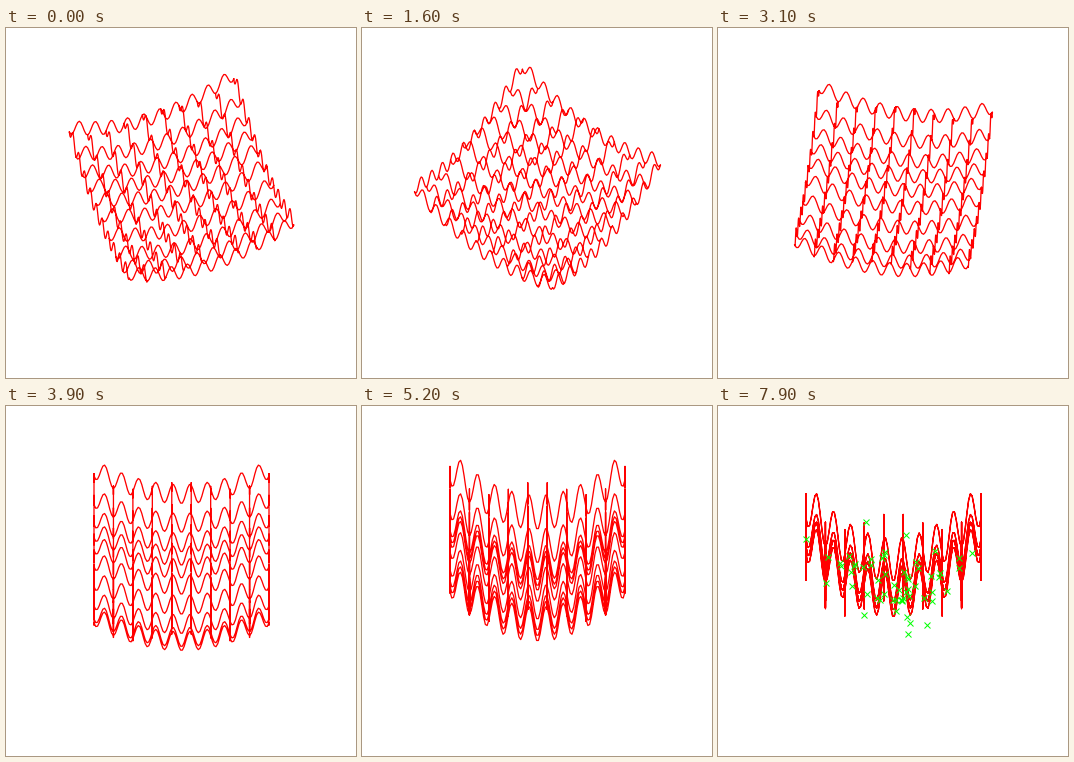
A matplotlib script that plays this animation: 350 px wide and 350 px high, repeating every 8 s.

```python
import matplotlib.pyplot as plt
import numpy as np
from matplotlib.animation import FuncAnimation

SIZE, DPI = 350, 100
FRAMES, STEP_MS = 80, 100
PX = 72 / DPI               # one pixel in points

LIMIT = 5.12                # Rastrigin domain
ISOLINES, SAMPLES = 10, 100
CX, CY = 175.5, 167.7       # projection centre
RX, RY = 87.5, 81.8         # half width and half height of the unit cube
Z_MID, Z_HALF = 32.5, 37.5

SPIN_END = 35               # turn about z stops, tilt begins
TILT_END = 71               # view is level, search points appear
POINTS = 58


def ridge(v):
    return v ** 2 + 10 * (1 - np.cos(2 * np.pi * v))


def lift(x, y):
    """Unit-cube coordinates of the surface above (x, y)."""
    return x / LIMIT, y / LIMIT, (ridge(x) + ridge(y) - Z_MID) / Z_HALF


def wireframe():
    """Isolines in both directions, separated by NaN."""
    run = np.append(np.linspace(-LIMIT, LIMIT, SAMPLES), np.nan)
    along = np.tile(run, ISOLINES)
    across = np.repeat(np.linspace(-LIMIT, LIMIT, ISOLINES), run.size)
    return lift(np.concatenate([along, across]),
                np.concatenate([across, along]))


def search_points():
    """Random trial points on the surface, densest near the optimum."""
    rng = np.random.default_rng(7)
    x = rng.normal(0.6, 2.4, POINTS)
    y = rng.normal(0, 2.2, POINTS)
    return lift(np.clip(x, -LIMIT, 4.6), np.clip(y, -LIMIT, LIMIT))


def project(x, y, z, spin, tilt):
    a, b = np.radians([spin, tilt])
    right = x * np.cos(a) + y * np.sin(a)
    depth = y * np.cos(a) - x * np.sin(a)
    return CX + RX * right, CY - RY * (depth * np.cos(b) + z * np.sin(b))


plt.rcParams["path.simplify"] = False
fig = plt.figure(figsize=(SIZE / DPI, SIZE / DPI), dpi=DPI, facecolor="white")
ax = fig.add_axes([0, 0, 1, 1])
ax.set(xlim=(0, SIZE), ylim=(SIZE, 0))
ax.axis("off")

surface, trials = wireframe(), search_points()
mesh, = ax.plot([], [], color="#ff0000", lw=1.3 * PX, snap=False)
marks, = ax.plot([], [], "x", color="#00ff00", ms=6 * PX, mew=PX)


def update(i):
    spin = 2 * max(SPIN_END - i, 0)
    tilt = 18 + 2 * (min(max(i, SPIN_END), TILT_END) - SPIN_END)
    mesh.set_data(*project(*surface, spin, tilt))
    progress = max(i - TILT_END, 0) / (FRAMES - 1 - TILT_END)
    shown = round(progress * POINTS)
    x, y = project(*trials, spin, tilt)
    marks.set_data(x[:shown], y[:shown])
    return mesh, marks


anim = FuncAnimation(fig, update, frames=FRAMES, interval=STEP_MS,
                     repeat=True, repeat_delay=0)
plt.show()
```
